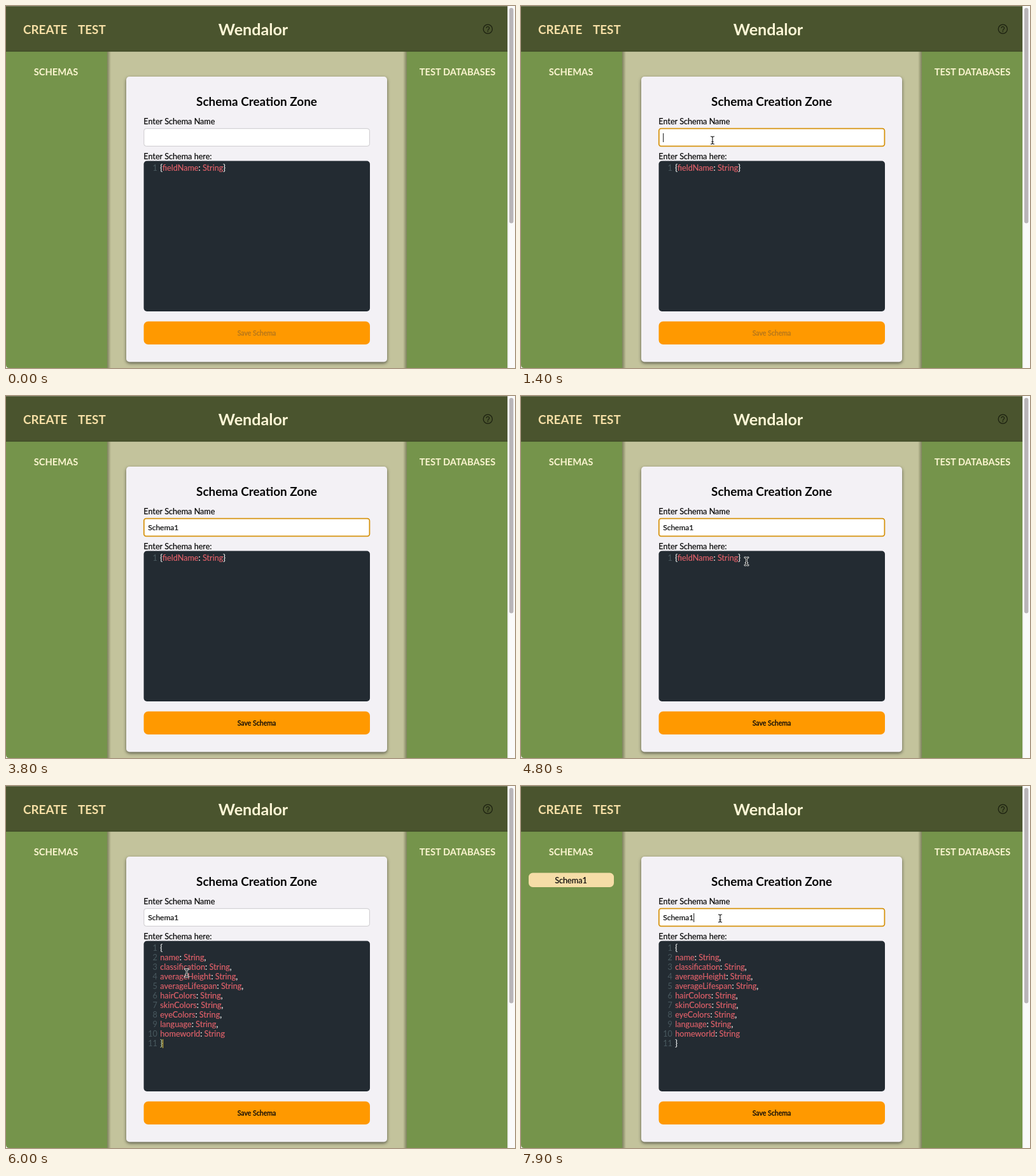
Animation of 800x569 px, one loop 8000 ms. Source, as an HTML page:

```html
<!DOCTYPE html>
<html lang="en">
<head>
<meta charset="utf-8">
<title>Schema form</title>
<style>
  html, body { margin: 0; width: 100%; height: 100%; overflow: hidden; background: #f4f4f2; }
  svg { display: block; width: 100vw; height: 100vh; }
  text { font: 400 12.65px Lato, sans-serif; white-space: pre; fill: #050505; stroke: #050505; stroke-width: .2px; }
  .mid { text-anchor: middle; }
  .end { text-anchor: end; }
  .bold { font-weight: 700; stroke: none; }
  .nav { font-size: 18.84px; fill: #f6dfa6; }
  .brand { font-size: 25.1px; fill: #fdf6d6; }
  .side { font-size: 14.7px; fill: #fbf5d0; }
  .heading { font-size: 18.9px; }
  .typed { font-size: 12px; }
  .button { font-size: 10.6px; stroke-width: .35px; }
  .code { fill: #f2f4f4; stroke: #f2f4f4; }
  .code .word { fill: #dd6069; stroke: #dd6069; }
  .code .match { fill: #cfdc9a; stroke: #cfdc9a; }
  .num { fill: #49595f; stroke: none; }
  .card { filter: drop-shadow(0 2px 2.5px rgba(0, 0, 0, .55)); }
</style>
</head>
<body>
<svg viewBox="0 0 800 569" preserveAspectRatio="none">
  <defs>
    <linearGradient id="shade">
      <stop offset="0" stop-color="#3a4020" stop-opacity=".5"/>
      <stop offset="1" stop-color="#3a4020" stop-opacity="0"/>
    </linearGradient>
  </defs>

  <rect x="159" y="71" width="471" height="498" fill="#c3c39c"/>
  <rect x="159" y="71" width="6" height="498" fill="url(#shade)"/>
  <rect x="-630" y="71" width="6" height="498" fill="url(#shade)" transform="scale(-1 1)"/>
  <path d="M0 71H159V569H5Q0 569 0 564Z" fill="#75944b"/>
  <rect x="630" y="71" width="158.5" height="498" fill="#75944b"/>
  <rect width="788.5" height="71.5" fill="#4a542e"/>
  <rect width="788.5" height="1" fill="#777e62"/>
  <rect y="70.5" width="788.5" height="1" fill="#3d4625"/>

  <rect x="788.5" width="11.5" height="569" fill="#fafafa"/>
  <rect x="788.5" width="1" height="569" fill="#e6e6e6"/>
  <rect x="791" y="3" width="6.5" height="338.5" rx="3.2" fill="#b9b5b8"/>

  <text class="bold nav" x="27" y="43.8">CREATE</text>
  <text class="bold nav" x="113" y="43.8">TEST</text>
  <text class="bold brand mid" x="388.5" y="46">Wendalor</text>
  <circle cx="757.3" cy="36.3" r="7.1" fill="none" stroke="#1c2110" stroke-width="1.3"/>
  <path d="M755 34.7a2.3 2.2 0 1 1 3.6 1.8q-1.3 .8-1.3 2.2M757.3 39.6v1.4" fill="none" stroke="#1c2110" stroke-width="1.3"/>
  <text class="bold side mid" x="78.5" y="109.3">SCHEMAS</text>
  <text class="bold side mid" x="709.5" y="109.3">TEST DATABASES</text>

  <g id="item">
    <rect x="12" y="136.5" width="134" height="22.5" rx="6.5" fill="#f6dda7"/>
    <text class="mid" x="78.5" y="152.6">Schema1</text>
  </g>

  <rect class="card" x="189" y="111" width="410" height="448.5" rx="5" fill="#f3f1f5"/>
  <text class="bold heading mid" x="394" y="157.3">Schema Creation Zone</text>
  <text x="216.3" y="186">Enter Schema Name</text>
  <rect id="box" x="216.8" y="192.7" width="354.6" height="27.6" rx="3.5" fill="#fff"/>
  <text id="name" class="typed" x="223.2" y="211.2"></text>
  <text x="216.3" y="241.2">Enter Schema here:</text>
  <rect x="216.5" y="243.5" width="355.5" height="236.5" rx="5" fill="#232b32"/>
  <g id="editor"></g>
  <rect x="216.5" y="495.8" width="355.5" height="36.2" rx="7" fill="#ff9900"/>
  <text id="save" class="button mid" x="394" y="517.6">Save Schema</text>

  <rect id="caret" width="1"/>
  <g id="beam" fill="none" stroke-linecap="round">
    <path id="beamEdge" stroke="#fff" stroke-width="2.8"/>
    <path id="beamLine" stroke="#111" stroke-width="1.1"/>
  </g>
  <path id="arrow" d="M0 0V11.6L2.7 9.1L4.6 13.4L6.6 12.5L4.7 8.4H8.3Z" fill="#000" stroke="#fff" stroke-width=".9"/>
</svg>

<script>
const LOOP = 8000, STEP = 100;
const ENTER = 600, FOCUS = 1000, EDIT = 5000, PASTE = 5600, BLUR = 6900, SAVED = 7100, REFOCUS = 7600;
const NAME = "Schema1";
const KEYS = [2000, 2200, 2300, 2400, 2600, 2800, 3100];
const FIELDS = ["name", "classification", "averageHeight", "averageLifespan", "hairColors",
  "skinColors", "eyeColors", "language", "homeworld"];
// Pointer stops: time, x, y
const PATH = [[600, 430, 172], [1000, 301, 211], [3900, 301, 211], [4700, 354.5, 260], [5200, 354.5, 260],
  [5900, 284, 294], [6200, 284, 294], [6800, 365, 518.5], [7200, 365, 518.5], [7600, 313, 208]];

const $ = id => document.getElementById(id);
const show = (el, on) => el.setAttribute("visibility", on ? "visible" : "hidden");
const set = (el, attrs) => { for (const k in attrs) el.setAttribute(k, attrs[k]); };

const beamShape = "M-2.6 -6Q0 -6 0 -4.2Q0 -6 2.6 -6M0 -4.5V4.5M-2.6 6Q0 6 0 4.2Q0 6 2.6 6M-1.3 2.2H1.3";
set($("beamEdge"), { d: beamShape });
set($("beamLine"), { d: beamShape });

const word = s => `<tspan class="word">${s}</tspan>`;
const field = s => `${word(s)}: ${word("String")}`;
const line = (html, i) => {
  const y = 259 + i * 15;
  return `<text class="num end" x="237.8" y="${y}">${i + 1}</text><text class="code" x="242.3" y="${y}">${html}</text>`;
};
const closing = '<tspan class="close">}</tspan>';
const DRAFT = [`{${field("fieldName")}${closing}`];
const FULL = ["{", ...FIELDS.map((f, i) => field(f) + (i < FIELDS.length - 1 ? "," : "")), closing];

let shown;
function fillEditor(lines) {
  if (lines === shown) return;
  shown = lines;
  $("editor").innerHTML = lines.map(line).join("");
}

function pointerAt(t) {
  let i = 0;
  while (i < PATH.length - 1 && PATH[i + 1][0] <= t) i++;
  const [t0, x0, y0] = PATH[i], [t1, x1, y1] = PATH[i + 1] || [t0 + 1, x0, y0];
  const p = Math.min(1, Math.max(0, (t - t0) / (t1 - t0)));
  const e = p * p * (3 - 2 * p);
  return [x0 + (x1 - x0) * e, y0 + (y1 - y0) * e];
}

function drawPointer(t) {
  const visible = t >= ENTER && (t < KEYS[0] || t >= 3900);
  const [x, y] = pointerAt(t);
  const inside = x > 217 && x < 572 && (y > 192 && y < 221 || y > 243 && y < 480);
  const beam = inside;
  show($("beam"), visible && beam);
  show($("arrow"), visible && !beam);
  const dark = y > 243;
  set($("beamEdge"), { stroke: dark ? "#e8ecec" : "#fff" });
  for (const id of ["beam", "arrow"]) set($(id), { transform: `translate(${x} ${y})` });
}

function drawCaret(t, inputFocus, editorFocus) {
  const since = [FOCUS, ...KEYS, EDIT, PASTE, REFOCUS].filter(k => k <= t).pop();
  const on = (inputFocus || editorFocus) && (t - since) % 1000 < 500;
  show($("caret"), on);
  if (!on) return;
  const el = inputFocus ? $("name") : $("editor").lastElementChild;
  const width = el.textContent ? el.getComputedTextLength() : 0;
  const y = inputFocus ? 200 : +el.getAttribute("y") - 11;
  set($("caret"), { x: +el.getAttribute("x") + width, y, height: 14, fill: inputFocus ? "#111" : "#e5c33c" });
}

function draw(t) {
  const inputFocus = t >= FOCUS && t < EDIT || t >= REFOCUS;
  const editorFocus = t >= EDIT && t < BLUR;
  const typed = KEYS.filter(k => k <= t).length;
  $("name").textContent = NAME.slice(0, typed);
  set($("box"), { stroke: inputFocus ? "#d6930f" : "#cccacd", "stroke-width": inputFocus ? 1.8 : 1 });
  const ink = typed ? "#0a0a0a" : "#b3761c";
  $("save").style.fill = $("save").style.stroke = ink;
  fillEditor(t < PASTE ? DRAFT : FULL);
  $("editor").querySelector(".close").classList.toggle("match", editorFocus);
  show($("item"), t >= SAVED);
  drawCaret(t, inputFocus, editorFocus);
  drawPointer(t);
}

const start = performance.now();
function tick() {
  const t = (performance.now() - start) % LOOP;
  draw(Math.floor(t / STEP) * STEP);
  requestAnimationFrame(tick);
}
tick();
</script>
</body>
</html>
```
